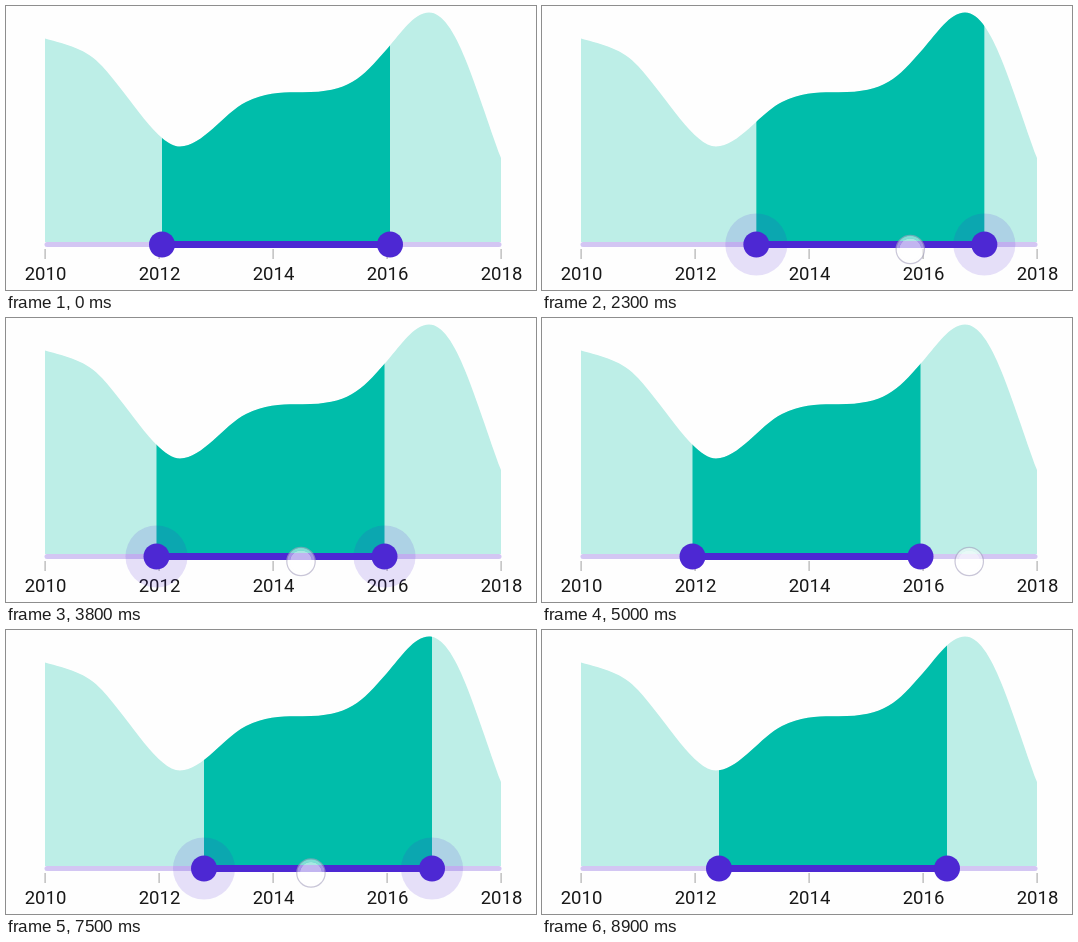
These frames come from a looping animation (530x284 px, 9.5 s). An HTML page with a canvas:

```html
<!DOCTYPE html>
<html>
<head>
<meta charset="utf-8">
<title>Range slider</title>
<style>
  html, body { margin: 0; width: 100%; height: 100%; overflow: hidden; background: #fefefe; }
  canvas { display: block; }
</style>
</head>
<body>
<canvas id="stage" width="530" height="284"></canvas>
<script>
const ctx = document.getElementById('stage').getContext('2d');
const LOOP = 9.5, STEPS_PER_SECOND = 10;
const START = 39, END = 495, TICK_GAP = 114, RANGE = 2 * TICK_GAP, AXIS_Y = 238.5;
const TEAL = '#00bdaa', MINT = '#bdeee7', PURPLE = '#4d28d3', LILAC = '#d3c6f3';

const area = new Path2D(`M39 236 V32.5
  C62 39 80 42.5 96 60 C126 93 152 140.5 174 140.5
  C196 140.5 218 107 240 96 C258 87 274 86.2 290 86.2
  C342 87.5 354 74 381 43 C395 27 408 6.5 423 6.5
  C450 6.5 469 82 495 152 V236 Z`);

const clamp = v => Math.min(1, Math.max(0, v));
const ease = u => (1 - Math.cos(Math.PI * clamp(u))) / 2;

// Eases from one turning point [seconds, value] to the next.
const glide = (...turns) => t => turns.slice(1).reduce((value, [time, next], i) => {
  const [before, previous] = turns[i];
  return value + (next - previous) * ease((t - before) / (time - before));
}, turns[0][1]);

// Rises from 0 to 1 at the start of a press and falls back at its end.
const press = (t, from, to) => clamp((t - from) / .2) * clamp((to - t) / .2);

const handleX = glide([1.33, 156], [1.75, 77], [2.6, 267], [2.79, 267], [3.42, 116],
  [3.75, 150.5], [7.05, 150.5], [7.5, 198], [8, 109], [8.4, 177]);
const cursorX = glide([1.35, 270], [1.72, 190], [2.55, 415], [3.38, 235], [3.8, 295],
  [4.2, 443], [4.45, 443], [4.75, 480], [5.1, 415], [5.4, 457], [5.55, 457],
  [6.62, 104], [7.45, 307], [7.95, 223], [8.4, 292]);
const cursorY = glide([5.4, 243.5], [6, 226], [6.6, 243]);

function disc(x, y, radius, color) {
  ctx.fillStyle = color;
  ctx.beginPath();
  ctx.arc(x, y, radius, 0, 2 * Math.PI);
  ctx.fill();
}

function ring(x, y, radius, width, color) {
  ctx.strokeStyle = color;
  ctx.lineWidth = width;
  ctx.beginPath();
  ctx.arc(x, y, radius, 0, 2 * Math.PI);
  ctx.stroke();
}

function bar(x0, x1, width, color) {
  ctx.strokeStyle = color;
  ctx.lineWidth = width;
  ctx.lineCap = 'round';
  ctx.beginPath();
  ctx.moveTo(x0, AXIS_Y);
  ctx.lineTo(x1, AXIS_Y);
  ctx.stroke();
}

function drawArea(left) {
  ctx.fillStyle = MINT;
  ctx.fill(area);
  ctx.save();
  ctx.beginPath();
  ctx.rect(left, 0, RANGE, 284);
  ctx.clip();
  ctx.fillStyle = TEAL;
  ctx.fill(area);
  ctx.restore();
}

function drawAxis() {
  ctx.font = '18.5px Roboto, sans-serif';
  ctx.textAlign = 'center';
  for (let i = 0; i < 5; i++) {
    const x = START + i * TICK_GAP;
    ctx.fillStyle = '#b0b0b0';
    ctx.fillRect(x - .5, 243, 1.2, 10);
    ctx.fillStyle = '#181818';
    ctx.fillText(2010 + 2 * i, x + .5, 274);
  }
}

function drawCursor(t) {
  const x = cursorX(t), y = cursorY(t);
  ctx.globalAlpha = press(t, 1, 8.6);
  disc(x, y, 11, 'rgba(255,255,255,.66)');
  ring(x, y, 12.4, 2.8, 'rgba(255,255,255,.5)');
  ring(x, y, 14.2, 1.2, 'rgba(165,160,190,.6)');
  ctx.globalAlpha = 1;
}

function draw(t) {
  const left = handleX(t), ends = [left, left + RANGE];
  const halo = 31 * (press(t, 1.1, 4.1) + press(t, 6.8, 8.5));
  ctx.fillStyle = '#fefefe';
  ctx.fillRect(0, 0, 530, 284);
  drawArea(left);
  drawAxis();
  bar(START + 2, END - 2, 5, LILAC);
  for (const x of ends) disc(x, AXIS_Y, halo, 'rgba(77,40,211,.14)');
  bar(...ends, 7, PURPLE);
  for (const x of ends) disc(x, AXIS_Y, 13, PURPLE);
  drawCursor(t);
}

function frame() {
  const t = performance.now() / 1000 % LOOP;
  draw(Math.floor(t * STEPS_PER_SECOND) / STEPS_PER_SECOND);
  requestAnimationFrame(frame);
}
frame();
</script>
</body>
</html>
```
